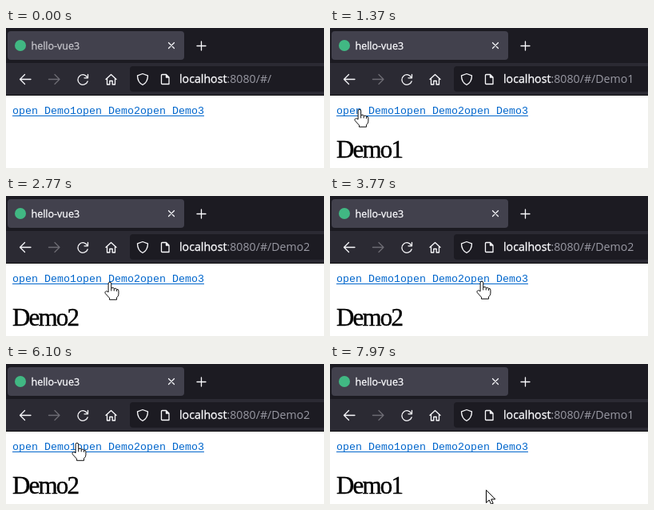
An HTML page that plays this animation: 398x176 px, repeating every 8000 ms.

```html
<!DOCTYPE html>
<html lang="en">
<head>
<meta charset="utf-8">
<style>
  html, body { margin: 0; width: 100%; height: 100%; overflow: hidden; background: #fff; }
  svg { display: block; width: 398px; height: 176px; }
  .ui { font-family: "Open Sans", sans-serif; fill: #fbfbfe; stroke: #fbfbfe; stroke-width: .3; }
  .dim { fill: #9a9aa4; stroke: none; }
  .line { fill: none; stroke: #fbfbfe; stroke-width: 1.3; stroke-linecap: round; stroke-linejoin: round; }
  .link { font: 13.333px "Liberation Mono", monospace; fill: #0066cc; }
  #head { font: 31px "Liberation Serif", serif; letter-spacing: -1.8px; stroke: #000; stroke-width: .4; }
  #cursor path { fill: #fff; stroke: #000; stroke-linejoin: round; }
</style>
</head>
<body>
<svg viewBox="0 0 398 176">
  <path fill="#1c1b22" d="M0 0h398v44H0z"/>
  <path fill="#2b2a33" d="M0 44h398v40H0z"/>
  <path fill="#0c0c0d" d="M0 84h398v1H0z"/>
  <rect x="2" y="4" width="221" height="36" rx="4" fill="#42414d"/>
  <rect x="155" y="48" width="260" height="32" rx="4" fill="#1c1b22"/>
  <circle cx="18" cy="22" r="7" fill="#41b883"/>
  <text id="title" class="ui" x="31.5" y="27" font-size="12.5">hello-vue3</text>

  <g class="line">
    <path d="M203.5 18.5l7 7m0-7l-7 7" stroke-width="1.2"/>
    <path d="M239 22.500h11M244.500 17v11"/>
    <path d="M31 64.500H17.500m6-6l-6 6 6 6"/>
    <path d="M53.500 64.500H67m-6-6l6 6-6 6" stroke="#6d6c74"/>
    <path d="M102 62.500a6.300 6.300 0 1 0 .2 4.500M102.500 58.500v4.300h-4.500"/>
    <path d="M125 64.500l6.500-6 6.500 6M126.500 63.500v7.500h3.300v-4.500h3.400v4.500h3.300v-7.500"/>
    <path d="M171 57.500l6.500 2.300c0 5.500-1.500 9.200-6.500 11.700-5-2.500-6.500-6.200-6.500-11.700z"/>
    <path d="M195.500 58.500h5l3.500 3.500v8.500h-8.500q-1 0-1-1v-10q0-1 1-1zM200.500 58.500v3.500h3.500"/>
  </g>
  <text class="ui" x="217" y="69" font-size="14.2">localhost<tspan class="dim">:8080/#/<tspan id="route"></tspan></tspan></text>

  <text class="link" x="8" y="108">open Demo1open Demo2open Demo3</text>
  <path fill="#0066cc" d="M8 110h240v1H8z"/>
  <text id="head" x="8" y="163"></text>

  <g id="cursor">
    <path id="arrow" d="M.5.500V16.500L4.200 13l2.500 5.300 2.500-1.100L6.800 12h5z"/>
    <path id="hand" transform="scale(.95)" d="M-2 13.500V2.200a1.900 1.900 0 0 1 3.800 0V8q3.200-1.400 3.700.8 3-.9 3.500 1 2.500-.4 2.500 2v4.200q0 3-2.500 4.800v2.700H-.5v-2.200L-5.800 15.500c-1.800-2.200 1-4 2.600-2.800zM1.800 8v4M5.500 9v3M9 10v2.500"/>
  </g>
</svg>
<script>
const $ = id => document.getElementById(id);
const STEP = 66.7, LOOP = 8000;

// pointer moves: start ms, number of steps, end x, end y
const moves = [
  [500, 7, 37, 102],
  [1840, 7, 130, 108],
  [3240, 9, 190, 107],
  [4700, 9, 142.500, 104],
  [5970, 3, 89, 99],
  [6170, 4, 69, 101],
  [7370, 10, 195, 158]
];
const pages = [[1170, "Demo1"], [2700, "Demo2"], [4040, "Demo3"], [5500, "Demo2"], [6570, "Demo1"]];

function pointer(t) {
  let x = 165, y = 185;
  for (const [start, steps, toX, toY] of moves) {
    if (t < start) break;
    const p = Math.min(1, (Math.floor((t - start) / STEP + .1) + 1) / steps);
    const e = 1 - (1 - p) ** 2;
    x += (toX - x) * e;
    y += (toY - y) * e;
  }
  return [x, y];
}

function draw(t) {
  const page = pages.filter(([start]) => t >= start).pop();
  $("route").textContent = $("head").textContent = page ? page[1] : "";
  $("title").style.opacity = .7 + .3 * Math.min(1, Math.max(0, (t - 1170) / 200));

  const [x, y] = pointer(t);
  const onLink = x > 8 && x < 248 && y > 96 && y < 112;
  $("cursor").setAttribute("transform", `translate(${Math.round(x)} ${Math.round(y)})`);
  $("hand").style.display = onLink ? "" : "none";
  $("arrow").style.display = onLink ? "none" : "";
}

function tick() {
  draw(performance.now() % LOOP);
  requestAnimationFrame(tick);
}
tick();
</script>
</body>
</html>
```
